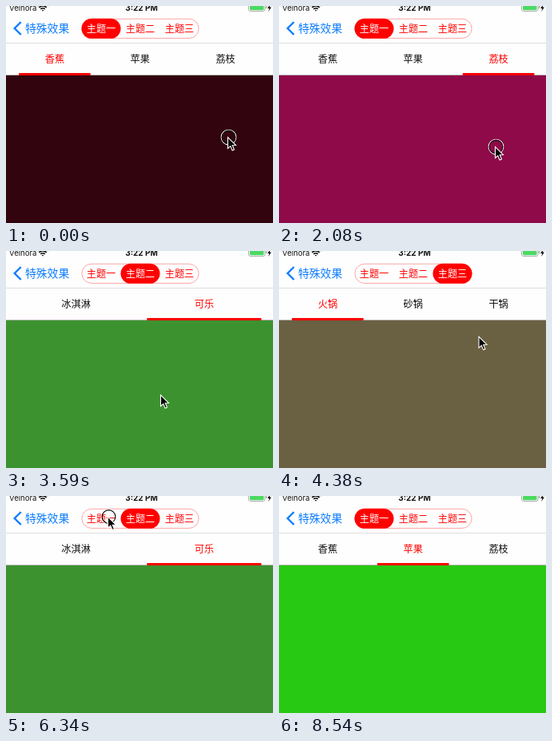
An HTML page with a canvas that plays this animation: 334x272 px, repeating every 8.97 s.

```html
<!DOCTYPE html>
<html lang="zh-CN">
<head>
<meta charset="utf-8">
<title>特殊效果</title>
<style>
  html, body { margin: 0; width: 100%; height: 100%; overflow: hidden; background: #fff; }
  canvas { display: block; width: 334px; height: 272px; }
</style>
</head>
<body>
<canvas id="stage"></canvas>
<script>
const W = 334, H = 272, LOOP = 8970;
const RED = '#ff0000', BLUE = '#0a7cff', INK = '#111';
const CJK = '"Noto Sans CJK SC", "Noto Sans CJK", sans-serif';
const LATIN = 'Inter, Roboto, sans-serif';
const PAGE_TOP = 87, SEGMENT = 49, SEGMENT_LEFT = 94.5;
const TRAVEL = 340; // longest pointer move between two gestures

const canvas = document.getElementById('stage');
const ctx = canvas.getContext('2d');
const dpr = window.devicePixelRatio || 1;
canvas.width = W * dpr;
canvas.height = H * dpr;
ctx.scale(dpr, dpr);

const themes = [
  { name: '主题一', tabs: ['香蕉', '苹果', '荔枝'], colors: ['#32040e', '#28c912', '#8e0a48'] },
  { name: '主题二', tabs: ['冰淇淋', '可乐'], colors: ['#4c5a6e', '#3d9230'] },
  { name: '主题三', tabs: ['火锅', '砂锅', '干锅'], colors: ['#6a6042', '#1c7b5f', '#4a4a70'] }
];

const at = (x, y) => ({ x, y });
const segmentX = i => SEGMENT_LEFT + SEGMENT * (i + 0.5);
const press = (start, length, from, to = from) => ({ start, end: start + length, from, to });
const tap = (start, theme, point = at(segmentX(theme), 29)) =>
  ({ ...press(start, 130, point), theme });
// A page keeps gliding as long again after the drag is let go.
const drag = (start, length, from, to, step = 1) =>
  ({ ...press(start, length, from, to), step, settled: start + 2 * length });

const gestures = [
  press(0, 330, at(277, 164)),
  drag(330, 320, at(277, 164), at(130, 172)),
  drag(1290, 300, at(270, 172), at(130, 176)),
  press(2060, 140, at(270, 176)),
  tap(2650, 1),
  drag(3180, 200, at(262, 180), at(193, 180)),
  tap(4000, 2),
  drag(4460, 260, at(255, 120), at(131, 89)),
  tap(5500, 1),
  tap(6330, 0, at(127, 25.5)),
  drag(7100, 303, at(95, 165), at(213, 166), -1),
  press(8100, 0, at(295, 275))
];

const lerp = (a, b, u) => a + (b - a) * u;
const ease = (t, a, b) => {
  const u = Math.min(1, Math.max(0, (t - a) / (b - a)));
  return u * u * (3 - 2 * u);
};

// Each theme remembers its own page, so gestures are replayed up to time t.
function stateAt(t) {
  const pages = themes.map(() => ({ position: 0, selected: 0 }));
  let active = 0;
  for (const g of gestures) {
    if (g.theme !== undefined && t >= g.end) active = g.theme;
    if (g.step && t >= g.start) {
      const page = pages[active];
      page.position += g.step * ease(t, g.start, g.settled);
      if (t >= g.settled) page.selected += g.step;
    }
  }
  return { active, page: pages[active] };
}

function pointerAt(t) {
  const next = gestures.findIndex(g => g.start > t);
  if (next < 0) return null;
  const now = gestures[next - 1], then = gestures[next];
  const pressed = t < now.end;
  const [a, b, u] = pressed
    ? [now.from, now.to, ease(t, now.start, now.end)]
    : [now.to, then.from, ease(t, Math.max(now.end, then.start - TRAVEL), then.start)];
  return { x: lerp(a.x, b.x, u), y: lerp(a.y, b.y, u), pressed };
}

function text(str, x, y, size, color, align = 'center', family = CJK, weight = 400) {
  ctx.font = `${weight} ${size}px ${family}`;
  ctx.textAlign = align;
  ctx.fillStyle = color;
  ctx.fillText(str, x, y);
}

function rect(x, y, w, h, color) {
  ctx.fillStyle = color;
  ctx.fillRect(x, y, w, h);
}

function fillPill(x, y, w, h, r, color) {
  ctx.beginPath();
  ctx.roundRect(x, y, w, h, r);
  ctx.fillStyle = color;
  ctx.fill();
}

function strokePill(x, y, w, h, r, color) {
  ctx.beginPath();
  ctx.roundRect(x, y, w, h, r);
  stroke(color, 0.8);
}

function stroke(color, width) {
  ctx.strokeStyle = color;
  ctx.lineWidth = width;
  ctx.stroke();
}

function arc(x, y, r, from = 0, to = Math.PI * 2) {
  ctx.beginPath();
  ctx.arc(x, y, r, from, to);
}

function drawStatusBar() {
  text('Velnora', 4, 6, 9.6, INK, 'left', LATIN);
  text('3:22 PM', 169.5, 6, 10, INK, 'center', LATIN, 700);

  for (let r = 1; r < 10; r += 2.8) {
    arc(46, 6.6, r, -Math.PI * 0.75, -Math.PI * 0.25);
    stroke(INK, 1.6);
  }

  strokePill(303.5, -3, 20.5, 9.5, 2.2, '#999');
  fillPill(305, -2, 17.5, 7.3, 1.2, '#4cd964');
  rect(325, 0, 1, 3, '#999');
  ctx.fillStyle = INK;
  ctx.fill(new Path2D('M330.5-2L327 3h2.3L328.2 7l3.8-5.4h-2.2z'));
}

function drawNavBar(active) {
  ctx.beginPath();
  ctx.moveTo(18.7, 20);
  ctx.lineTo(10.7, 28);
  ctx.lineTo(18.7, 36);
  stroke(BLUE, 2.4);
  text('特殊效果', 24, 33, 13.8, BLUE, 'left');

  strokePill(SEGMENT_LEFT + 0.4, 16.2, SEGMENT * 3 - 0.8, 24.2, 12.1, '#ff8f8f');
  fillPill(SEGMENT_LEFT + active * SEGMENT, 15.8, SEGMENT, 25, 12.5, RED);
  themes.forEach(({ name }, i) =>
    text(name, segmentX(i), 32.8, 12.2, i === active ? '#fff' : RED));
  rect(0, 46, W, 0.7, '#d2d2d2');
}

function drawPages({ tabs, colors }, { position, selected }) {
  const step = 320.5 / tabs.length;
  const barWidth = step - 17;
  const left = 16;

  rect(0, PAGE_TOP - 1, W, 1, '#b8b8b8');
  colors.forEach((color, i) =>
    rect((i - position) * W, PAGE_TOP, W + 0.5, H - PAGE_TOP, color));
  tabs.forEach((tab, i) =>
    text(tab, left + barWidth / 2 + i * step, 70.8, 12.2, i === selected ? RED : INK));
  fillPill(left + position * step, 84, barWidth, 3, 1, RED);
}

const arrow = new Path2D('M.5.5v14l3.3-2.9L6.1 17l2.4-1-2.3-5.3 4.3-.2z');

function drawPointer({ x, y, pressed }) {
  ctx.save();
  ctx.translate(x, y);
  if (pressed) {
    arc(1.5, 0.5, 9.3);
    stroke('#fff', 1.1);
    arc(1.5, 0.5, 8.4);
    stroke('#000', 1.1);
  }
  ctx.fillStyle = '#000';
  ctx.fill(arrow);
  ctx.strokeStyle = '#fff';
  ctx.lineWidth = 1.1;
  ctx.stroke(arrow);
  ctx.restore();
}

function draw(t) {
  const { active, page } = stateAt(t);
  const pointer = pointerAt(t);
  rect(0, 0, W, H, '#fefefe');
  drawStatusBar();
  drawNavBar(active);
  drawPages(themes[active], page);
  if (pointer) drawPointer(pointer);
}

const began = performance.now();
function tick() {
  draw((performance.now() - began) % LOOP);
  requestAnimationFrame(tick);
}
tick();
</script>
</body>
</html>
```
